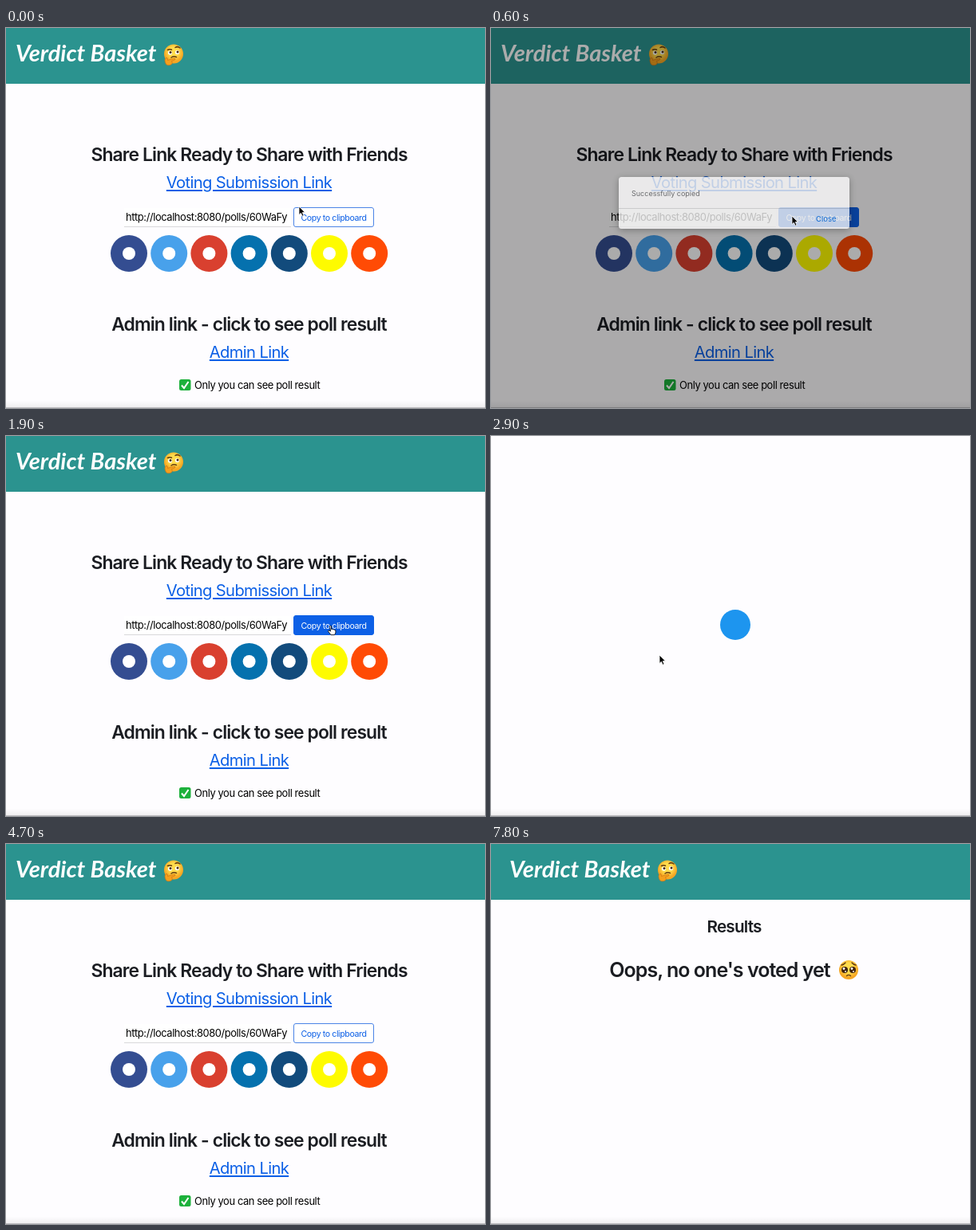
These frames come from a looping animation (600 by 477 pixels, 8 s). An HTML page:

```html
<!DOCTYPE html>
<html lang="en">
<head>
<meta charset="utf-8">
<title>Poll sharing</title>
<style>
  html, body { margin: 0; width: 100%; height: 100%; overflow: hidden; background: #fefdff; }
  svg { display: block; width: 600px; height: 477px; font-family: Inter, sans-serif; letter-spacing: -.025em; fill: #1b1d22; }
  .mid { text-anchor: middle; }
  .head { font-size: 22.9px; font-weight: 560; letter-spacing: -.039em; }
  .link { font-size: 20.2px; letter-spacing: -.032em; fill: #0b5fe6; text-decoration: underline; text-decoration-thickness: 1.3px; }
  .small { font-size: 12.9px; fill: #000; }
  .brand { font: italic 700 29px Lato, sans-serif; letter-spacing: 0; fill: #fff; }
  #copy rect { fill: #fff; stroke: #4b84e6; }
  #copy text { font-size: 10.6px; fill: #0b5fe6; }
  #copy.hover rect { fill: #0d60e6; stroke: #0d60e6; }
  #copy.hover text { fill: #fff; }
  #dialog { filter: drop-shadow(0 2px 4px #0006); }
  #dialog text { letter-spacing: 0; }
</style>
</head>
<body>
<svg viewBox="0 0 600 477">
  <defs>
    <radialGradient id="skin" cy=".4">
      <stop offset=".5" stop-color="#ffdc4d"/><stop offset="1" stop-color="#f5a623"/>
    </radialGradient>
    <linearGradient id="edge" x2="0" y2="1">
      <stop stop-opacity="0"/><stop offset="1" stop-opacity=".06"/>
    </linearGradient>
    <g id="thinking">
      <circle r="12" fill="url(#skin)"/>
      <path d="M-7.5-5q2.5-1.5 5-.3M2-8q3-2 6 .5M-3 4.5q3-2 6.5-.5" fill="none" stroke="#633c10" stroke-width="1.5" stroke-linecap="round"/>
      <g fill="#fff"><circle cx="-4.5" cy="-1.5" r="2.6"/><circle cx="4.5" cy="-2" r="2.6"/></g>
      <g fill="#4a2b0c"><circle cx="-4" cy="-2" r="1.5"/><circle cx="5" cy="-2.6" r="1.5"/></g>
      <path d="M-9.5 13q-3-6 0-8 2-1 2 3l8-2.5q2.5 0 1 2l-4 1.5q2 4-2 5-3 1-5-1z" fill="#f4a01e" stroke="#cf7414" stroke-width=".7"/>
    </g>
    <g id="pleading">
      <circle r="12" fill="url(#skin)"/>
      <path d="M-9-6q3-.5 5-3M9-6q-3-.5-5-3M-2.5 7.5q2.5-2.3 5 0" fill="none" stroke="#633c10" stroke-width="1.3" stroke-linecap="round"/>
      <g fill="#41240c"><circle cx="-5" r="4"/><circle cx="5" r="4"/></g>
      <g fill="#fff">
        <circle cx="-6" cy="-1.5" r="1.4"/><circle cx="4" cy="-1.5" r="1.4"/>
        <circle cx="-4" cy="2" r=".9"/><circle cx="6" cy="2" r=".9"/>
      </g>
    </g>
  </defs>

  <rect width="600" height="477" fill="#fefdff"/>
  <g id="site">
    <rect width="600" height="70" fill="#2b938f"/>
    <g id="brand">
      <text class="brand" x="12" y="42">Verdict Basket</text>
      <use href="#thinking" x="210" y="32.5"/>
    </g>
  </g>

  <g id="share">
    <text class="mid head" x="304.5" y="167">Share Link Ready to Share with Friends</text>
    <text class="mid link" x="304.5" y="201">Voting Submission Link</text>
    <rect x="148" y="226" width="209" height="24" fill="#fff"/>
    <path d="M148 249.5h209" stroke="#d8d8da"/>
    <text class="small" x="150" y="242">http://localhost:8080/polls/60WaFy</text>
    <g id="copy">
      <rect x="360.5" y="225.5" width="100" height="24" rx="2.5"/>
      <text class="mid" x="410.5" y="241.5">Copy to clipboard</text>
    </g>
    <g id="buttons"></g>
    <text class="mid head" x="304.5" y="380">Admin link - click to see poll result</text>
    <text class="mid link" x="304.5" y="414">Admin Link</text>
    <rect x="217" y="441" width="14.5" height="14" rx="2.5" fill="#1db13c"/>
    <path d="M220 448.5l3 3.5 5.5-8" fill="none" stroke="#fff" stroke-width="2"/>
    <text class="small" x="236" y="453">Only you can see poll result</text>
  </g>

  <g id="results">
    <text class="mid head" x="304.5" y="111" style="font-size: 20.7px">Results</text>
    <text class="mid head" x="286.5" y="167" style="font-size: 25px">Oops, no one's voted yet</text>
    <use href="#pleading" x="448" y="158"/>
  </g>

  <circle id="splash" cx="306" cy="237" r="19" fill="#1d95ef"/>

  <rect y="468" width="600" height="8" fill="url(#edge)"/>
  <rect y="476" width="600" height="1" fill="#bdbcbf"/>

  <rect id="shade" width="600" height="477" fill="#000"/>
  <g id="dialog">
    <rect x="160" y="187" width="289" height="65" rx="3.5" fill="#fff"/>
    <path d="M160 226.5h289" stroke="#d5d5d8"/>
    <text x="176" y="211" font-size="9" fill="#55565a">Successfully copied</text>
    <text x="407" y="243" font-size="9.4" font-weight="500" fill="#1477e6">Close</text>
  </g>

  <g id="cursor" stroke="#fff" stroke-width=".8" stroke-linejoin="round">
    <path id="arrow" d="M0 0v10.5l2.4-2.2 1.7 3.9 1.9-.8-1.7-3.8h3.2z" fill="#000"/>
    <path id="hand" d="M-1 .5q1-1 2 0v4l1-.3 1 .6 1-.2 1 .7 1.3.3q.8 3.4-1.3 5.9h-4.5l-3.5-4.5q0-1.5 1.5-1l1.5 1z" fill="#fff" stroke="#111" stroke-width=".9"/>
  </g>
</svg>
<script>
const LOOP = 8000;
const $ = id => document.getElementById(id);
const clamp = v => Math.max(0, Math.min(1, v));
const show = (id, on) => $(id).setAttribute('display', on ? 'inline' : 'none');

$('buttons').innerHTML = ['#344d91', '#48a1eb', '#d9402f', '#0571ae', '#124b7c', '#fefb00', '#ff4b05']
  .map((color, i) => {
    const x = 154 + i * 50.2;
    return `<circle cx="${x}" cy="283" r="23" fill="${color}"/><circle cx="${x}" cy="283" r="8" fill="#fff"/>`;
  }).join('');

// time, x, y of the pointer's tip
const path = [
  [0, 367, 224], [300, 377, 236], [900, 377, 236], [1300, 418, 236], [1800, 418, 236],
  [2500, 211, 275], [3200, 211, 275], [4100, 140, -16], [4700, 140, -16],
  [5600, 319, 410], [6700, 319, 410], [7700, 100, -16], [LOOP, 100, -16]
];

function pointer(t) {
  const i = path.findIndex(p => p[0] > t);
  const [t0, x0, y0] = path[i - 1], [t1, x1, y1] = path[i];
  const k = (t - t0) / (t1 - t0), e = k * k * (3 - 2 * k);
  return [x0 + (x1 - x0) * e, y0 + (y1 - y0) * e];
}

function draw(t) {
  const splash = t >= 2800 && t < 4700;
  const results = t >= 6000;
  const share = !splash && !results;
  const fade = clamp((t - 330) / 360) * clamp((1800 - t) / 300);
  const [x, y] = pointer(t);
  const over = (left, top, right, bottom) => x > left && x < right && y > top && y < bottom;

  show('site', !splash);
  show('share', share);
  show('results', results);
  show('splash', splash);
  $('brand').setAttribute('transform', `translate(${results ? 11 : 0})`);
  $('shade').setAttribute('opacity', fade * .44);
  $('dialog').setAttribute('opacity', fade);

  const onCopy = over(360, 225, 461, 250);
  $('copy').classList.toggle('hover', share && onCopy);

  const hand = fade > 0
    ? over(404, 230, 436, 248)
    : share && (onCopy || over(131, 260, 478, 306) || over(254, 395, 355, 418) || over(200, 182, 409, 206));
  $('cursor').setAttribute('transform', `translate(${x} ${y})`);
  show('arrow', !hand);
  show('hand', hand);
}

function tick() {
  draw(Math.floor(performance.now() % LOOP / 100) * 100);
  requestAnimationFrame(tick);
}
tick();
</script>
</body>
</html>
```
